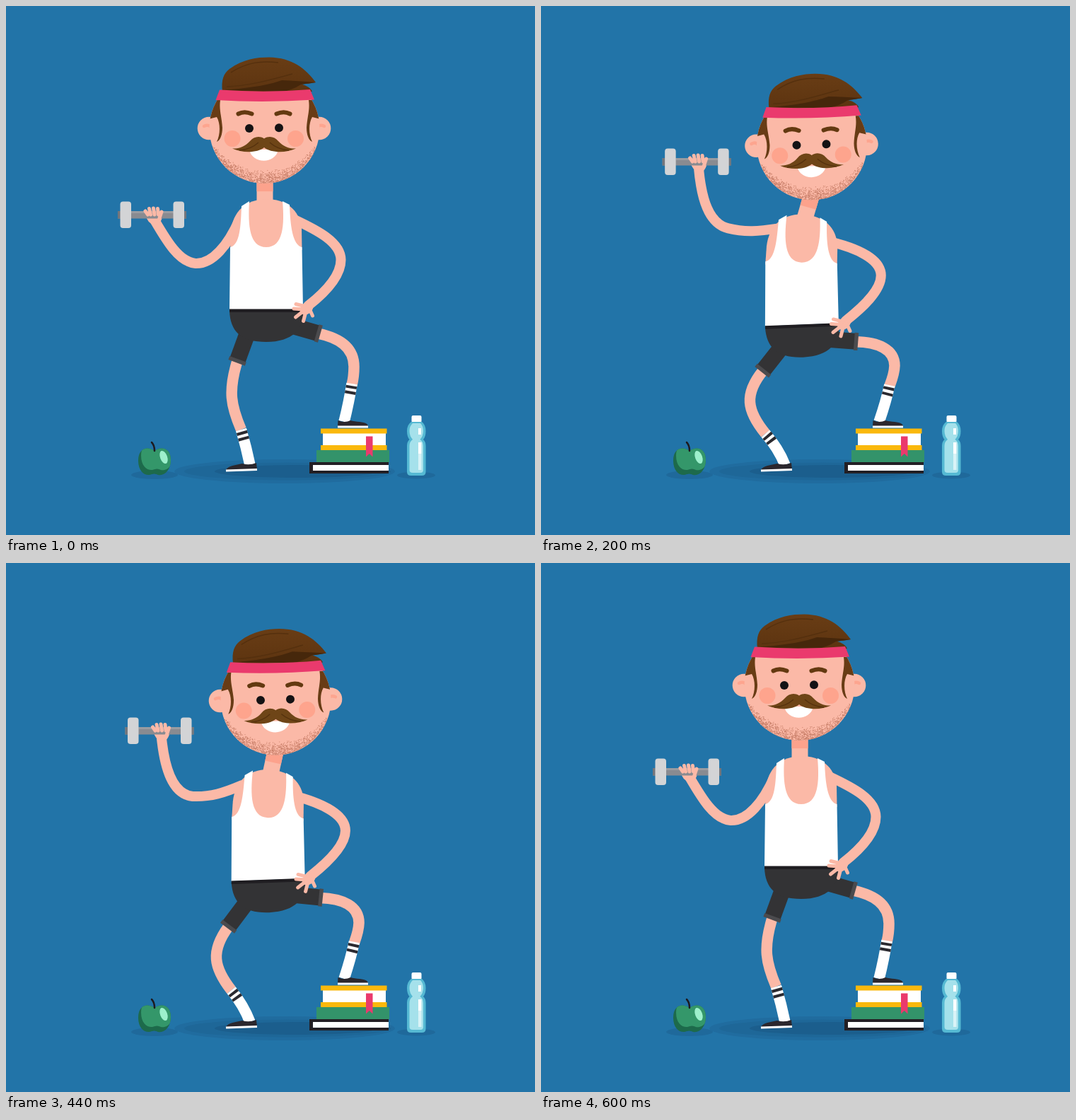
Animation, 748 px wide and 748 px high, one loop 0.64 s. Source, as an HTML page:

```html
<!DOCTYPE html>
<html lang="en">
<head>
<meta charset="utf-8">
<title>Workout</title>
<style>
  html, body { margin: 0; width: 100%; height: 100%; overflow: hidden; background: #2274a8; }
  svg { display: block; width: 100vw; height: 100vh; }
  .limb, .sock, .stripes, .thigh, .cuff, .neck { fill: none; }
  .limb { stroke: #fbb9a7; stroke-width: 15.5; }
  .arm { stroke-width: 14; stroke-linecap: round; }
  .sock { stroke: #fff; stroke-width: 15.5; }
  .stripes { stroke: #2b2a30; stroke-width: 15.5; stroke-dasharray: 0 3 4 4 4 999; }
  .thigh { stroke: #333335; stroke-width: 23; }
  .cuff { stroke: #4b4b4e; stroke-width: 25; }
  .neck { stroke: #fbb9a7; stroke-width: 23; }
  .skin { fill: #fbb9a7; }
  .finger { fill: none; stroke: #fbb9a7; stroke-width: 5; stroke-linecap: round; }
</style>
</head>
<body>
<svg viewBox="0 0 748 748">
  <defs>
    <clipPath id="faceClip"><circle cx="365.5" cy="173" r="78"/></clipPath>
    <path id="appleShape" d="M210 629C200 622 187 625 187 643C187 658 196 664 203 663Q210 660 215 663C225 665 233 655 233 642C233 625 220 622 210 629Z"/>
    <clipPath id="appleClip"><use href="#appleShape"/></clipPath>
    <linearGradient id="hairTone" x1="0" y1="0" x2="0" y2="1">
      <stop offset="0" stop-color="#693d15"/><stop offset="1" stop-color="#5d3410"/>
    </linearGradient>
    <g id="sideburn">
      <path d="M280 133H303C301 147 305 156 306 172C306 182 303 190 298 192C303 182 303.500 166 298 157L286 160Z" fill="#683c15"/>
    </g>
  </defs>

  <g id="ground">
    <ellipse cx="394" cy="658" rx="156" ry="17" fill="#206c9f"/>
    <ellipse cx="398" cy="658" rx="146" ry="12.5" fill="#1e6798"/>
    <ellipse cx="410" cy="658" rx="115" ry="9" fill="#1b5e8d"/>
    <ellipse cx="210" cy="663" rx="33" ry="6" fill="#1f699b"/>
    <ellipse cx="580" cy="663.5" rx="27" ry="5" fill="#1f699b"/>
  </g>

  <g id="apple">
    <use href="#appleShape" fill="#1d6a4b"/>
    <g clip-path="url(#appleClip)">
      <use href="#appleShape" fill="#34976a" transform="translate(4 -7)"/>
    </g>
    <ellipse cx="223" cy="638" rx="5" ry="9.5" fill="#9df0cc" transform="rotate(-20 223 638)"/>
    <path d="M210 629Q210 621 206 617" fill="none" stroke="#1d1a1f" stroke-width="2.5" stroke-linecap="round"/>
  </g>

  <g id="books">
    <path d="M429 645H541V661H429Z" fill="#231f24"/>
    <path d="M434 649H541V657H434Z" fill="#fff"/>
    <path d="M439 628H542V645H439Z" fill="#33936a"/>
    <path d="M448 604H537V622H448Z" fill="#fff"/>
    <path d="M445 597.5H538.5V604.5H445ZM445 621H538.5V628H445Z" fill="#fab80c"/>
    <path d="M509 608.5H518.5V637.5L513.8 633L509 637.5Z" fill="#ea3a6d"/>
  </g>

  <g id="bottle">
    <rect x="573.5" y="579" width="14" height="10" rx="2" fill="#fff"/>
    <path d="M573 588H588Q593.5 592 593.5 601Q593.5 609 590 613Q593.5 616 593.5 622V659Q593.5 664 588 664H572.500Q567 664 567 659V622Q567 616 570.500 613Q567 609 567 601Q567 592 573 588Z" fill="#55b9d3"/>
    <path d="M575 590H586Q590 594 590 601Q590 608 585.500 613Q590 616 590 622V656Q590 660 586 660H575Q570.500 660 570.500 656V622Q570.500 616 575 613Q570.500 608 570.500 601Q570.500 594 575 590Z" fill="#a5e1eb"/>
    <path d="M583 597H587V606H583ZM583 617H587.500V633H583Z" fill="#fff"/>
    <path d="M583 633H587.500V656H583Z" fill="#d9f3f7"/>
  </g>

  <g id="legs">
    <path class="limb" id="shinL"/><path class="limb" id="shinR"/>
    <path class="sock" id="sockL"/><path class="sock" id="sockR"/>
    <path class="stripes" id="stripesL"/><path class="stripes" id="stripesR"/>
    <path d="M311 656C314 650 325 649 334 647Q344 650 354 646L355 656Z" fill="#2b272d"/>
    <path d="M311 657L355 655.500" stroke="#fff" stroke-width="3"/>
    <path d="M469.500 586Q479 590 487 586C497 589 511 587 512 594H469Z" fill="#2b272d"/>
    <path d="M469 595H512" stroke="#fff" stroke-width="3"/>
  </g>

  <g id="hips">
    <path class="thigh" id="thighL"/><path class="thigh" id="thighR"/>
    <path class="cuff" id="cuffL"/><path class="cuff" id="cuffR"/>
    <path id="shorts" fill="#333335"/>
  </g>

  <path class="limb arm" id="armL"/>
  <path class="limb arm" id="armR"/>
  <path class="neck" id="neck"/>
  <path class="neck" id="neckShade" style="stroke:#fca28c"/>
  <path class="skin" id="torso"/>
  <path id="shirt" fill="#fff"/>
  <path id="band" fill="#1f1d21"/>

  <g id="handR">
    <ellipse class="skin" cx="425" cy="428" rx="10" ry="7.5" transform="rotate(-35 425 428)"/>
    <path class="finger" d="M424 425L410 421.500M421 429L407 428M421 431L409.500 440M424 432L420.500 445.500M429 428L433.500 438"/>
  </g>

  <g id="head">
    <circle class="skin" cx="287" cy="173" r="16.3"/>
    <circle class="skin" cx="443" cy="173" r="16.3"/>
    <path d="M280 170Q288 166 292 175M450 170Q442 166 438 175" fill="none" stroke="#fda58f" stroke-width="4.500" stroke-linecap="round"/>
    <circle class="skin" cx="365.5" cy="173" r="78"/>
    <g clip-path="url(#faceClip)">
      <path id="stubble" fill="#c97f69"/>
      <use href="#sideburn"/>
      <use href="#sideburn" transform="translate(731 0) scale(-1 1)"/>
    </g>
    <path d="M306 121C304 104 308 95 316 89C335 75 355 72.500 372 72.500C405 73 424 89 438 108Q428 110 418 110.500Q430 114 433 121Z" fill="url(#hairTone)"/>
    <path d="M307 119C345 116 370 112 390 105Q412 106 438 108Q424 110 417 111Q405 119 390 121Z" fill="#46270b"/>
    <path d="M312 114C345 113 375 104 405 96M318 94C340 80 360 77 385 80" fill="none" stroke="#55300e" stroke-width="1.500"/>
    <path d="M302 118.500Q368 123 430 118L436 132.500Q366 137 296.500 133Z" fill="#ea3a6d"/>
    <path d="M328.500 152.500Q337 148 347.500 152.500M382.500 152.500Q393 148 401.500 152.500" fill="none" stroke="#633910" stroke-width="6" stroke-linecap="round"/>
    <circle cx="344" cy="173" r="6" fill="#141214"/>
    <circle cx="386" cy="172.300" r="6" fill="#141214"/>
    <circle cx="320" cy="187.500" r="11.500" fill="#fea48d"/>
    <circle cx="409.500" cy="187.500" r="11.500" fill="#fea48d"/>
    <path d="M344 203C348 224 381 224 385 203Z" fill="#fff"/>
    <path d="M365 187.500C358 183 350 185 345 191C338 199 329 202 320 201.500C335 208.500 356 207.500 365 200C374 207.500 395 208.500 410 201.500C401 202 392 199 385 191C380 185 372 183 365 187.500Z" fill="#6e4517"/>
    <path d="M330 204Q346 203 357 193M400 204Q384 203 373 193" fill="none" stroke="#55310d" stroke-width="1.300"/>
  </g>

  <g id="weight">
    <path class="skin" d="M198 297H222L219 304Q215 312 208 309Q200 306 198 297Z"/>
    <path d="M158 290H255V300.500H158Z" fill="#898b91"/>
    <path d="M158 290H162V300.500H158ZM251.500 290H255V300.500H251.500Z" fill="#74767c"/>
    <path d="M177 290H237V293H177Z" fill="#9a9ca1"/>
    <rect x="161.500" y="276.500" width="15.500" height="37.500" rx="4" fill="#d3d4d6"/>
    <rect x="236.500" y="276.500" width="15.500" height="37.500" rx="4" fill="#d3d4d6"/>
    <path class="finger" d="M197 290L200.500 295M202.500 286.500L204.500 295M208.500 286L210 295M214.500 286.500L215.500 295M220 291L216 303"/>
  </g>
</svg>

<script>
const STEP = 40, LOOP = 640, CYCLE = 600, DOWN = 320;
const $ = id => document.getElementById(id);
const draw = (id, d) => $(id).setAttribute('d', d);
const place = (id, tf) => $(id).setAttribute('transform', tf);

// dumbbell offset, shoulder, handles and elbow of the lifting arm, hip shift
const times = [0, 80, 160, 280, 320, 440, 520];
const poses = [
  [0, 0, 330, 302, 314, 338, 292, 365, 268, 364, 244, 362, 226, 330, 0],
  [4, -20, 332, 308, 306, 334, 284, 355, 263, 354, 240, 352, 228, 322, -.3],
  [11, -60, 332, 312, 306, 322, 290, 329, 266, 328, 236, 326, 224, 292, 0],
  [18, -99.5, 345, 319, 312, 314, 283, 307, 261, 289, 241, 272, 234, 235, 3],
  [10.5, -58, 334, 314, 308, 325, 290, 331, 264, 330, 236, 327, 224, 292, 2.7],
  [5, -24.5, 332, 308, 304, 334, 284, 353, 262, 351, 240, 349, 228, 318, .7]
];
// small overshoot at the top of the lift
poses.splice(4, 0, poses[3].map((v, i) => v + .05 * (v - poses[2][i])));

function key(i) {
  const n = times.length, k = (i + n) % n;
  return { t: times[k] + CYCLE * Math.floor(i / n), v: poses[k] };
}

// periodic cubic through the key poses
function poseAt(t) {
  let i = times.length - 1;
  while (times[i] > t) i--;
  const [a, b, c, d] = [-1, 0, 1, 2].map(k => key(i + k));
  const h = c.t - b.t, u = (t - b.t) / h;
  return b.v.map((v, j) => {
    const m0 = (c.v[j] - a.v[j]) / (c.t - a.t) * h;
    const m1 = (d.v[j] - b.v[j]) / (d.t - b.t) * h;
    const s = u * u * (3 - 2 * u);
    return v + s * (c.v[j] - v) + u * (1 - u) * ((1 - u) * m0 - u * m1);
  });
}

function mix(a, b, k) {
  const to = b.match(/-?[\d.]+/g);
  let i = 0;
  return a.replace(/-?[\d.]+/g, n => +n + (to[i++] - n) * k);
}

function warp(path, fn) {
  return path.replace(/(-?[\d.]+) (-?[\d.]+)/g, (_, x, y) => fn(+x, +y).join(' '));
}

// spine curve: hips tilt one way, shoulders the other
function bender(p, shift) {
  const rad = Math.PI / 180 * p;
  return (x, y) => {
    const v = Math.max(0, (430 - y) / 155);
    const a = (-3.3 + 9.5 * v) * rad;
    const low = Math.max(0, y - 430);
    return [
      x + shift + 155 * rad * (4.75 * v * v - 3.3 * v) - low * Math.sin(a),
      y + 31.3 * p + (x - 368) * Math.sin(a)
    ];
  };
}

function thigh(side, x0, y0, x1, y1) {
  const len = Math.hypot(x1 - x0, y1 - y0);
  const ux = (x1 - x0) / len, uy = (y1 - y0) / len;
  draw('thigh' + side, `M${x0} ${y0}L${x1} ${y1}`);
  draw('cuff' + side, `M${x1 - 3 * ux} ${y1 - 3 * uy}L${x1 + 2.5 * ux} ${y1 + 2.5 * uy}`);
}

function sock(side, d) {
  draw('sock' + side, d);
  draw('stripes' + side, d);
}

function render(t) {
  const u = t < DOWN ? t / DOWN : (CYCLE - t) / (CYCLE - DOWN);
  const p = (1 - Math.cos(Math.PI * u)) / 2;
  const s = p * (1.5 - .5 * p);
  const [dx, dy, sx, sy, ax, ay, bx, by, ex, ey, cx, cy, wx, wy, shift] = poseAt(t % CYCLE);
  const bend = bender(p, shift);

  // standing leg
  const kx = 327 - 16 * Math.sqrt(p), ky = 502 + 20 * p;
  const fx = 332.5 - 19 * s, fy = 599 + 7 * s;
  draw('shinL', `M${kx} ${ky}C${314 - 34 * s} ${545 + 5 * s} ${318 - 34 * s} ${565 + 9 * s} ${fx} ${fy}`);
  sock('L', `M${fx} ${fy}Q${340 - 5 * s} ${625 + s} 345 649`);
  thigh('L', 346 + 4 * p, 450 + 31 * p, kx, ky);

  // raised leg
  draw('shinR', mix('M441 463C470 469 492 482 492 510C492 520 491 528 489 536',
                    'M446 480C480 478 503.5 487 503.5 508C503 520 498 530 494.5 538', p));
  sock('R', mix('M489 534Q485 560 478 588', 'M494.5 537Q490 556 478 588', p));
  thigh('R', 400 + 3 * p, 451 + 29 * p, 442 + 5.5 * p, 463 + 16.5 * p);

  // trunk
  draw('shorts', warp('M316 431L420 431C422 456 405 475 368 475C332 475 317 460 316 431Z', bend));
  draw('band', warp('M316 428.5L420 428.5L420 433L316 433Z', bend));
  draw('torso', warp('M317 345L318 320C320 290 340 273.500 368 273C396 273 415 288 418 315L418.500 345Z', bend));
  draw('shirt', warp('M317 341C331 338 332 310 333 283L344 276C342 310 344 341 368 341' +
    'C392 341 394 310 391 276L401 281C402 310 405 338 418.500 341L420 429L316 429Z', bend));

  // head and neck
  const hx = 22.3 * s, hy = 33.8 * p;
  const [nx, ny] = bend(366 + 4 * s, 281);
  const tx = 366 + hx, ty = 240 + hy;
  const q = .54;
  draw('neck', `M${nx} ${ny}L${tx} ${ty}`);
  draw('neckShade', `M${tx + (nx - tx) * q} ${ty + (ny - ty) * q}L${tx} ${ty}`);
  place('head', `translate(${hx} ${hy}) rotate(${-1.5 * p} 366 190)`);

  // arms
  draw('armL', `M${sx} ${sy}C${ax} ${ay} ${bx} ${by} ${ex} ${ey}C${cx} ${cy} ${wx} ${wy} ${209 + dx} ${301 + dy}`);
  place('weight', `translate(${dx} ${dy})`);
  draw('armR', mix('M408 302C440 317 473.500 334 473.500 359C473.500 382 450 406 427 424',
                   'M412 348C445 353 484 367 484 391C484 412 455 437 432 455', p));
  place('handR', `translate(${5 * p} ${31 * p})`);
}

function growStubble() {
  let seed = 7, d = '';
  const rnd = () => (seed = seed * 16807 % 2147483647) / 2147483647;
  for (let i = 0; i < 8500; i++) {
    const x = 288 + 155 * rnd(), y = 197 + 54 * rnd();
    const depth = 78 - Math.hypot(x - 365.5, y - 173);
    const reach = 3 + 26 * (y - 197) / 54;
    if (depth > 0 && rnd() * 1.3 < 1 - depth / reach) {
      d += `M${x.toFixed(1)} ${y.toFixed(1)}h1v1h-1z`;
    }
  }
  draw('stubble', d);
}

function tick() {
  render(Math.floor(performance.now() % LOOP / STEP) * STEP);
  requestAnimationFrame(tick);
}

growStubble();
tick();
</script>
</body>
</html>
```
